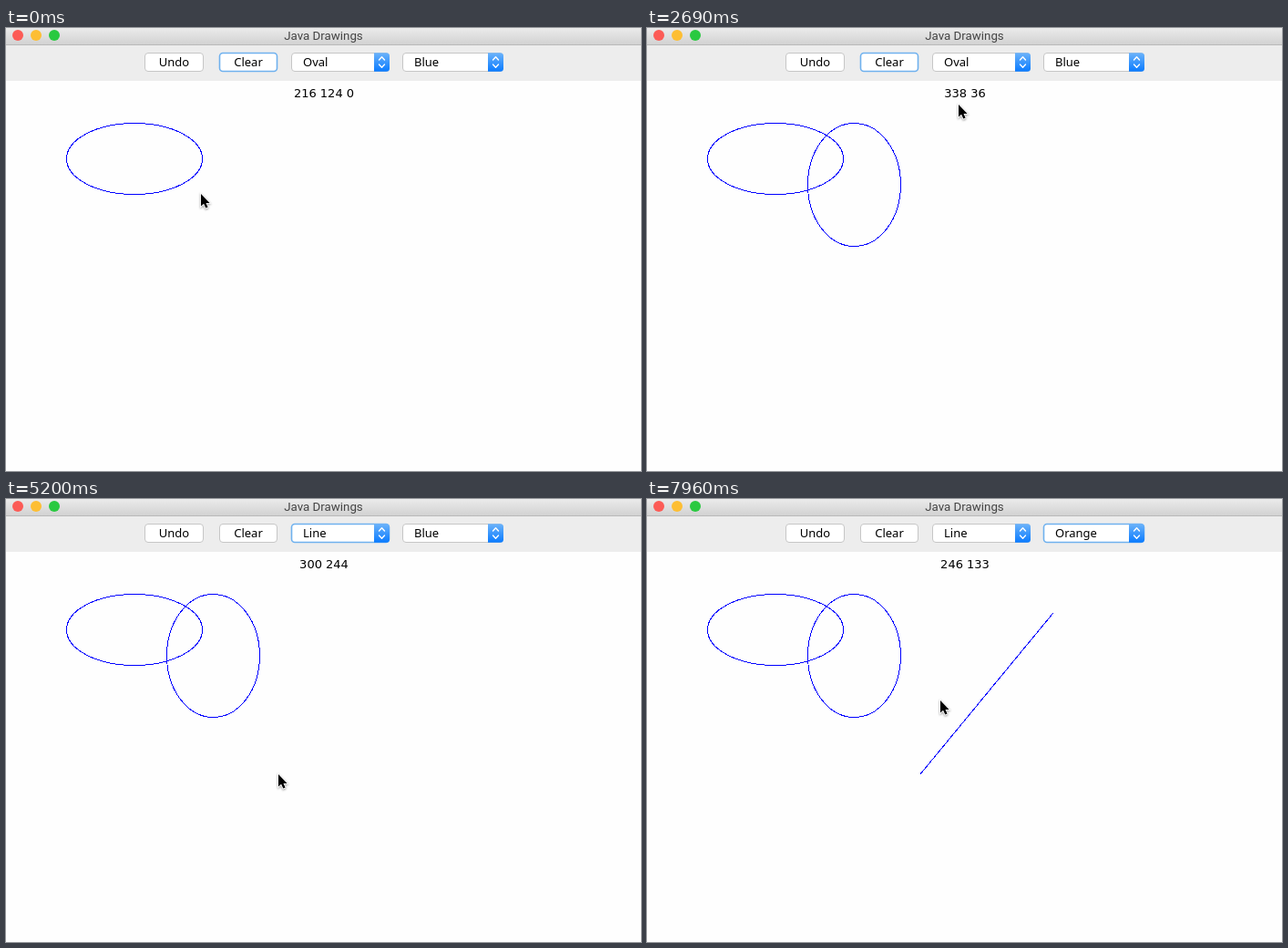
Write an HTML page that moves like this. It is 697x486 px and loops after 8 s.

```html
<!DOCTYPE html>
<html lang="en">
<head>
<meta charset="utf-8">
<title>Java Drawings</title>
<style>
  html, body { margin: 0; width: 100%; height: 100%; overflow: hidden; background: #fefefe; }
  svg { display: block; width: 697px; height: 486px; }
  text { font: 13px "Noto Sans", sans-serif; fill: #000; white-space: pre; }
  .title { font: 13.3px Roboto, sans-serif; fill: #444; }
  .mid { text-anchor: middle; }
  #label, .check { font-family: "DejaVu Sans", sans-serif; }
  .ink { fill: none; stroke: #00f; shape-rendering: crispEdges; }
  .box { fill: #fff; stroke: #c6c6c6; }
  .focus .box { stroke: #6fb1ee; stroke-width: 1.6; }
  .chevron { fill: none; stroke: #fff; stroke-width: 1.4; stroke-linecap: round; stroke-linejoin: round; }
  .menu { filter: drop-shadow(0 3px 4px rgba(0, 0, 0, .2)); }
  .panel { fill: #ececec; stroke: #c2c2c2; stroke-width: .6; }
  .row rect { fill: none; }
  .row.on rect { fill: #0869dc; }
  .row.on text { fill: #fff; }
  #cursor { filter: drop-shadow(0 1px .8px rgba(0, 0, 0, .4)); }
</style>
</head>
<body>
<svg viewBox="0 0 697 486">
  <defs>
    <linearGradient id="bar" x2="0" y2="1"><stop stop-color="#ebebeb"/><stop offset="1" stop-color="#d2d2d2"/></linearGradient>
    <linearGradient id="cap" x2="0" y2="1"><stop stop-color="#6cb3fa"/><stop offset="1" stop-color="#0a7bff"/></linearGradient>
  </defs>
  <rect width="697" height="486" fill="#fefefe"/>
  <rect width="697" height="58" fill="#ededed"/>
  <rect width="697" height="18" fill="url(#bar)"/>
  <rect y="18" width="697" height="1" fill="#b9b9b9"/>
  <circle cx="13" cy="8" r="6" fill="#fc5b56"/>
  <circle cx="33" cy="8" r="6" fill="#fdbe33"/>
  <circle cx="53" cy="8" r="6" fill="#29c940"/>
  <text class="title mid" x="348.5" y="13">Java Drawings</text>
  <g id="controls"></g>
  <text id="label" class="mid" x="349" y="76"></text>
  <ellipse class="ink" id="oval1"/>
  <ellipse class="ink" id="oval2"/>
  <line class="ink" id="line" x1="299.5" y1="302.5"/>
  <g id="menus"></g>
  <g id="cursor">
    <path d="M1 1V14.6L4.1 11.8 6.3 16.6 8.6 15.6 6.5 10.9H10.6Z" stroke="#fff" stroke-width="1.6" paint-order="stroke"/>
  </g>
</svg>
<script>
const $ = id => document.getElementById(id);
const show = (el, on) => el.setAttribute('visibility', on ? 'visible' : 'hidden');
const set = (el, attrs) => { for (const k in attrs) el.setAttribute(k, attrs[k]); };

const LOOP = 8000, TICK = 89.5, LAG = 0.68;
const DRAG_OVAL = 10, OVAL_DONE = 22, DRAG_LINE = 59, LINE_DONE = 61;
const SHAPE_MENU = [37, 51], COLOR_MENU = [71, 83];

// Pointer path: tick, x, y
const path = [
  [-1, 214.5, 181], [0, 213, 181], [5, 184, 119], [7, 173, 105], [9, 175, 103], [11, 252, 205],
  [12, 280, 235.5], [13, 286, 240], [17, 280, 240], [18, 280, 240], [22, 277, 238], [26, 277, 238],
  [29, 333.6, 97.7], [30, 341, 83], [32, 390, 65], [33, 408.75, 52.5], [35, 408, 35], [38, 408, 35],
  [41, 393, 36], [47, 358, 20], [51, 358, 20], [53, 345, 70], [57, 298, 301], [58, 298, 301],
  [60, 436, 135], [61, 444, 124], [63, 444, 124], [65, 402, 72], [66, 380, 44], [69, 505, 36],
  [71, 505, 36], [75, 492, 106], [79, 492, 106], [80, 490, 104], [82, 490, 104],
  [87, 240, 150], [88, 208, 176], [90, 434, 264]
];

function button(x, w, name) {
  return `<g><rect class="box" x="${x}" y="27.5" width="${w}" height="20" rx="3.5"/>
    <text class="mid" x="${x + w / 2}" y="42">${name}</text></g>`;
}
function combo(x, w) {
  const cap = x + w - 16.5, c = cap + 8.5;
  return `<g><rect class="box" x="${x}" y="27.5" width="${w}" height="20" rx="3.5"/>
    <path d="M${cap} 27.3h13.5q3.5 0 3.5 3.5v13.4q0 3.5-3.5 3.5h-13.5z" fill="url(#cap)"/>
    <path class="chevron" d="M${c - 3} 35l3-3.2 3 3.2M${c - 3} 40l3 3.2 3-3.2"/>
    <text x="${x + 12.5}" y="42"></text></g>`;
}
function menu(x, y, w, h, top, items, checked, rowWidth, textX, extra = '') {
  const rows = items.map((name, i) => `<g class="row">
    <rect x="${x}" y="${top + 18 * i}" width="${rowWidth}" height="18"/>
    <text x="${textX}" y="${top + 14 + 18 * i}">${name}</text>
    ${i === checked ? `<text class="check" x="${textX - 18}" y="${top + 14 + 18 * i}">✓</text>` : ''}</g>`);
  return `<g class="menu"><rect class="panel" x="${x}" y="${y}" width="${w}" height="${h}"/>${extra}${rows.join('')}</g>`;
}

$('controls').innerHTML = button(152.5, 64, 'Undo') + button(234.5, 63, 'Clear') + combo(313.5, 107) + combo(435.5, 110);
const [, clear, shapeBox, colorBox] = $('controls').children;

const scrollbar = `<rect x="531" y="47.5" width="15" height="143.5" fill="#f4f4f4"/>
  <rect x="535" y="104" width="8" height="86" rx="4" fill="#c1c1c1"/>`;
$('menus').innerHTML =
  menu(303, 6, 111, 62, 10, ['Line', 'Oval', 'Rectangle'], 1, 111, 326) +
  menu(437, 47, 109, 144, 47, ['Light Gray', 'Dark Gray', 'Gray', 'Orange', 'Pink', 'White', 'Cyan', 'Blue'], 7, 94, 460, scrollbar);
const [shapeMenu, colorMenu] = $('menus').children;

const within = (n, [from, to]) => n >= from && n < to;

function pointer(n) {
  const i = Math.max(1, path.findIndex(p => p[0] >= n));
  const [a, ax, ay] = path[i - 1], [b, bx, by] = path[i];
  const k = (n - a) / (b - a);
  return [ax + (bx - ax) * k, ay + (by - ay) * k];
}

// Last position the drawing area has heard of; it trails a moving pointer.
function reported(n) {
  for (;; n--) {
    if (within(n, SHAPE_MENU) || within(n, COLOR_MENU)) continue;
    const moving = String(pointer(n)) !== String(pointer(n + 1));
    const [x, y] = pointer(moving ? n - LAG : n);
    if (y >= 58) return [Math.round(x + 2), Math.round(y - 57)];
  }
}

function dragIndex(n) {
  if (n < 1) return ' 0';
  if (n >= DRAG_OVAL && n < 27) return ' 1';
  if (n >= DRAG_LINE && n < 64) return ' 2';
  return '';
}

function oval(el, x0, y0, x1, y1) {
  set(el, { cx: (x0 + x1 + 1) / 2, cy: (y0 + y1 + 1) / 2, rx: Math.abs(x1 - x0) / 2, ry: Math.abs(y1 - y0) / 2 });
}

function highlight(el, index) {
  el.querySelectorAll('.row').forEach((row, i) => row.classList.toggle('on', i === index));
}

function render(n) {
  const [px, py] = pointer(n);
  $('cursor').setAttribute('transform', `translate(${Math.round(px)} ${Math.round(py)})`);
  $('label').textContent = reported(n).join(' ') + dragIndex(n);

  show($('oval2'), n >= DRAG_OVAL);
  const [ox, oy] = reported(Math.min(n, OVAL_DONE));
  oval($('oval2'), 176, 104, ox - 1, oy + 58);

  show($('line'), n >= DRAG_LINE);
  const [lx, ly] = reported(Math.min(n, LINE_DONE));
  set($('line'), { x2: lx - 0.5, y2: ly + 58.5 });

  clear.classList.toggle('focus', n < SHAPE_MENU[0]);
  shapeBox.classList.toggle('focus', within(n, [SHAPE_MENU[0], COLOR_MENU[0]]));
  colorBox.classList.toggle('focus', n >= COLOR_MENU[0]);
  shapeBox.querySelector('text').textContent = n < SHAPE_MENU[1] ? 'Oval' : 'Line';
  colorBox.querySelector('text').textContent = n < COLOR_MENU[1] ? 'Blue' : 'Orange';

  show(shapeMenu, within(n, SHAPE_MENU));
  show(colorMenu, within(n, COLOR_MENU));
  highlight(shapeMenu, Math.floor((py - 10) / 18));
  highlight(colorMenu, py < 47 ? 7 : Math.floor((py - 47) / 18));
}

oval($('oval1'), 66, 104, 215, 182);
const start = performance.now();
let shown = -1;
function frame() {
  const t = Math.max(0, performance.now() - start) % LOOP;
  const n = Math.floor((t + 6) / TICK);
  if (n !== shown) render(shown = n);
  requestAnimationFrame(frame);
}
frame();
</script>
</body>
</html>
```
